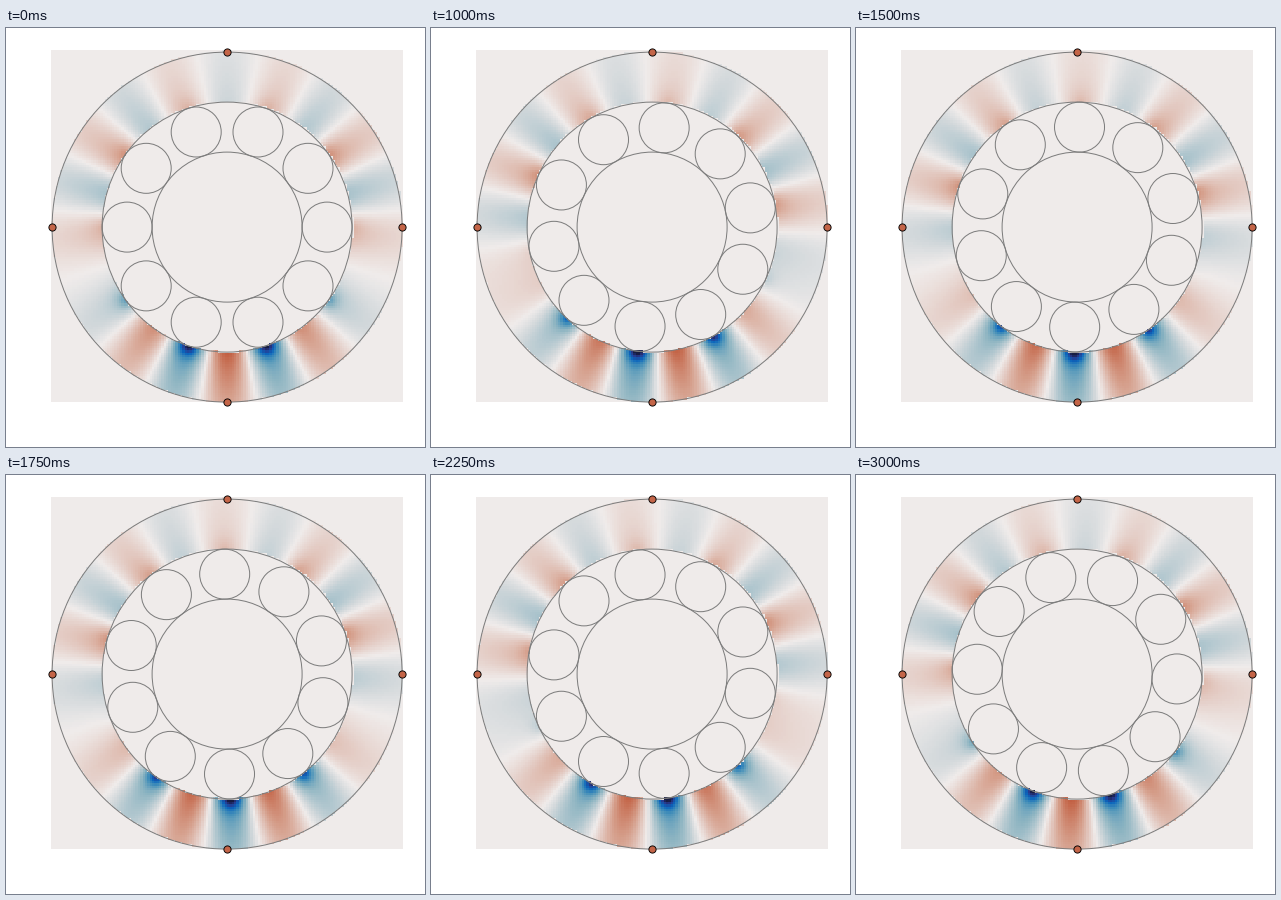
These frames come from a looping animation (419 px wide and 419 px high, 3.25 s). A matplotlib script:

```python
import numpy as np
import matplotlib.pyplot as plt
from matplotlib.animation import FuncAnimation
from matplotlib.colors import LinearSegmentedColormap
from matplotlib.patches import Circle

SIZE, DPI = 419, 100
FRAMES, INTERVAL = 13, 250
CX, CY = 221.1, 199.1
R_OUT, R_RACE, R_SHAFT = 175, 125, 75
R_ROLL, R_PITCH = 25, 100
ROLLERS, CELLS = 10, 150
BOX = (45, 396, 23, 374)
PX = 72 / DPI
GRAY = "#7c7c7c"

stops = [(23, 28, 66), (41, 58, 143), (11, 102, 189), (69, 144, 185),
         (142, 181, 194), (210, 216, 219), (230, 210, 204), (213, 157, 137),
         (196, 101, 72), (172, 43, 36), (120, 14, 40), (60, 9, 17)]
nodes = [(i / 11, np.array(c) / 255) for i, c in enumerate(stops)]
nodes.insert(6, (0.5, np.array((240, 236, 235)) / 255))
cmap = LinearSegmentedColormap.from_list("diverging", nodes, N=512)


def centers(lo, hi):
    return lo + (np.arange(CELLS) + 0.5) * (hi - lo) / CELLS


X, Y = np.meshgrid(centers(BOX[0], BOX[1]) - CX, CY - centers(BOX[2], BOX[3]))
R, THETA = np.hypot(X, Y), np.arctan2(Y, X)
RING = (R >= R_RACE) & (R <= R_OUT)


def load(theta):
    """Signed load around the ring, strongest at the bottom."""
    s = -np.sin(theta)
    return -0.25 + 0.61 * s + 0.64 * s**2


def roller_angles(frame):
    return (np.arange(ROLLERS) + frame / FRAMES) * 2 * np.pi / ROLLERS


def field(frame):
    angles = roller_angles(frame)
    phase = ROLLERS * (THETA - angles[0])
    fade = 0.48 * np.exp(-(R - R_RACE) / 77)
    value = -fade * (load(THETA) * np.cos(phase)
                     + 0.22 * np.cos(THETA) * np.sin(phase))
    for a in angles:
        w = load(a)
        dist = np.hypot(X - R_RACE * np.cos(a), Y - R_RACE * np.sin(a))
        peak = 0.75 * w if w > 0 else 0.3 * w
        value -= peak * np.exp(-(dist / (8 if w > 0 else 11)) ** 1.3)
    return np.where(RING, value, 0)


fig = plt.figure(figsize=(SIZE / DPI, SIZE / DPI), dpi=DPI, facecolor="white")
ax = fig.add_axes([0, 0, 1, 1])
ax.axis("off")

image = ax.imshow(field(0), cmap=cmap, vmin=-1, vmax=1, aspect="auto",
                  interpolation="nearest",
                  extent=(BOX[0], BOX[1], BOX[3], BOX[2]))
ax.set(xlim=(0, SIZE), ylim=(SIZE, 0))


def outline(x, y, r):
    return ax.add_patch(Circle((x, y), r, fill=False, ec=GRAY, lw=PX))


for radius in (R_OUT, R_RACE, R_SHAFT):
    outline(CX, CY, radius)
rollers = [outline(CX, CY, R_ROLL) for _ in range(ROLLERS)]

ax.plot(CX + R_OUT * np.array([1, 0, -1, 0]),
        CY + R_OUT * np.array([0, 1, 0, -1]), "o", ms=7.2 * PX,
        mfc=np.array((196, 101, 72)) / 255, mec="black", mew=0.9 * PX)


def update(frame):
    image.set_data(field(frame))
    for roller, a in zip(rollers, roller_angles(frame)):
        roller.center = (CX + R_PITCH * np.cos(a), CY - R_PITCH * np.sin(a))
    return [image, *rollers]


anim = FuncAnimation(fig, update, frames=FRAMES, interval=INTERVAL,
                     repeat=True, repeat_delay=0)
plt.show()
```
